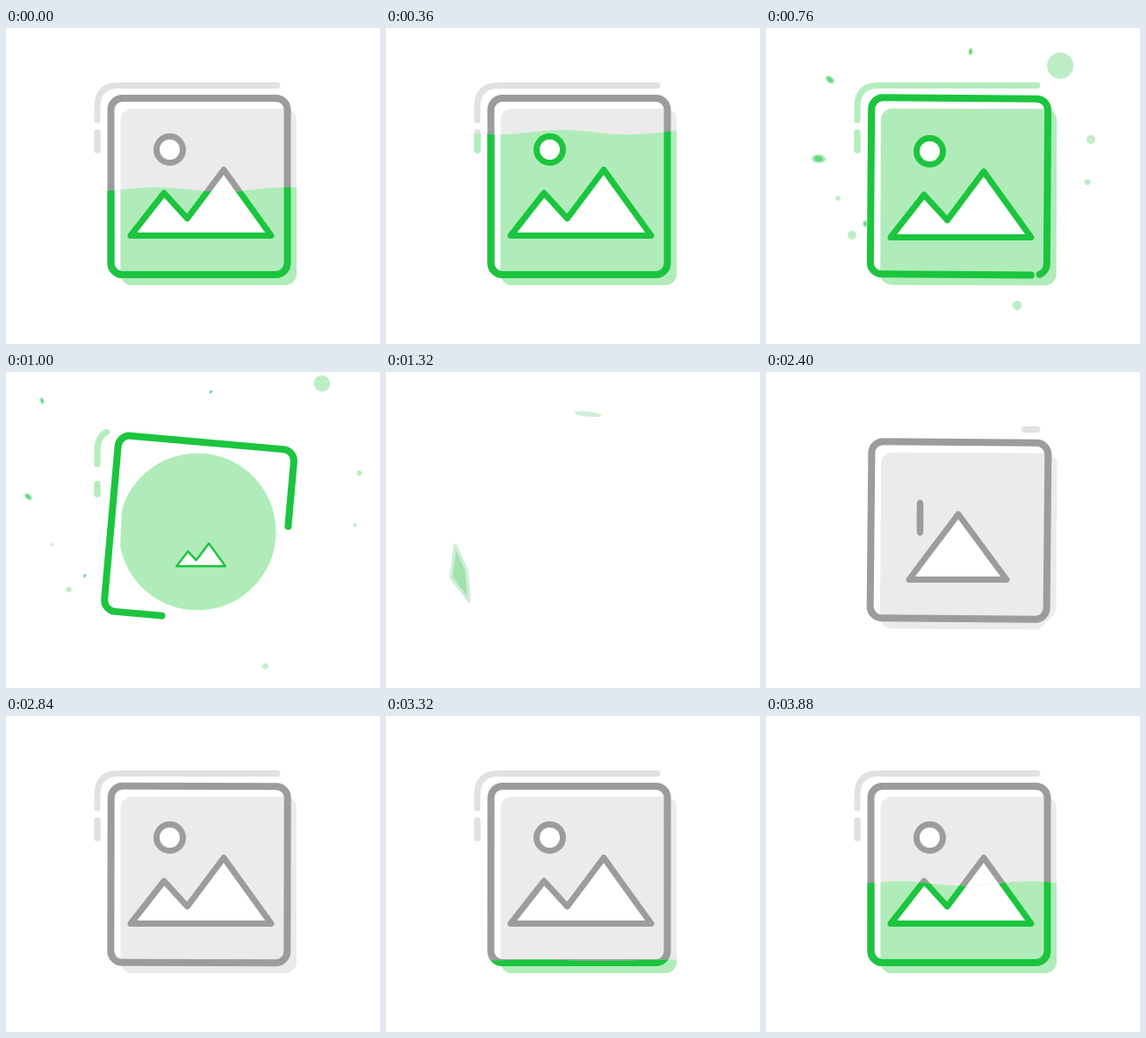
Write an HTML page that moves like this. It is 426 px wide and 360 px high and loops after 3920 ms.

```html
<!DOCTYPE html>
<html lang="en">
<head>
<meta charset="utf-8">
<title>Picture icon loader</title>
<style>
html, body { margin: 0; width: 100%; height: 100%; overflow: hidden; background: #fff; }
svg { display: block; width: 426px; height: 360px; }
</style>
</head>
<body>
<svg viewBox="0 0 426 360" xmlns="http://www.w3.org/2000/svg">
  <defs>
    <clipPath id="level"><path id="wave"/></clipPath>
    <clipPath id="disk"><circle id="spot" cx="218" cy="182"/></clipPath>
  </defs>
  <g id="grey"></g>
  <g id="liquid" clip-path="url(#level)"></g>
  <g id="shards"></g>
  <g id="drops"></g>
</svg>
<script>
const LOOP = 3920;
const REBUILD = 1700;
const FULL = 4640;
const CX = 220, CY = 181;
const $ = id => document.getElementById(id);

function add(parent, tag, attrs = {}) {
  const el = document.createElementNS('http://www.w3.org/2000/svg', tag);
  set(el, attrs);
  parent.appendChild(el);
  return el;
}
function set(el, attrs) {
  for (const k in attrs) el.setAttribute(k, attrs[k]);
}
const show = (el, on) => { el.style.display = on ? '' : 'none'; };
const mix = (a, b, k) => a + (b - a) * k;
const span = (t, a, b) => Math.max(0, Math.min(1, (t - a) / (b - a)));
const ease = (t, a, b) => { const k = span(t, a, b); return k * k * (3 - 2 * k); };
const decay = (t, tau) => Math.exp((REBUILD - t) / tau);

function makeIcon(g, c) {
  const line = (color, width, d = '') => add(g, 'path', {
    d, fill: 'none', stroke: color, 'stroke-width': width,
    'stroke-linecap': 'round', 'stroke-linejoin': 'round', pathLength: 1
  });
  const clip = add(g, 'g', { 'clip-path': 'url(#disk)' });
  const icon = {
    g,
    panel: add(clip, 'rect', { x: 130.5, y: 92, width: 200.5, height: 201, rx: 13, fill: c.pale }),
    arc: line(c.trim, 7, 'M309 65.5H128Q104 65.5 104 90V105'),
    dash: line(c.trim, 7.5, 'M104 119V139'),
    frame: line(c.ink, 8, 'M307.5 281A13 13 0 0 0 320.5 268V93A13 13 0 0 0 307.5 80H132.5A13 13 0 0 0 119.5 93V268A13 13 0 0 0 132.5 281H307.5'),
    hill: line(c.ink, 7),
    sun: add(g, 'ellipse', { fill: '#fff', stroke: c.ink, 'stroke-width': 7 })
  };
  icon.hill.setAttribute('fill', '#fff');
  return icon;
}

const icons = [
  makeIcon($('grey'), { ink: '#9b9c9b', pale: '#ebebeb', trim: '#e1e1e1' }),
  makeIcon($('liquid'), { ink: '#1bc53e', pale: '#b0ecb9', trim: '#b3edbc' })
];

function makeDrop(x, y, r, turn) {
  const g = add($('drops'), 'g');
  const seed = turn !== undefined;
  add(g, 'ellipse', { rx: r, ry: seed ? r * 0.62 : r, fill: seed ? '#a8e9b4' : '#bdeec6' });
  if (seed) add(g, 'ellipse', { rx: r * 0.6, ry: r * 0.38, fill: '#63d77c' });
  return { g, x, y, turn: turn || 0, gain: Math.min(1, Math.abs(x - CX) / 100) };
}
const drops = [
  makeDrop(335, 43, 15), makeDrop(370, 127, 5), makeDrop(366, 175.5, 3.5),
  makeDrop(286, 316, 5.3), makeDrop(98, 236, 5), makeDrop(82, 194, 2.8),
  makeDrop(113, 223, 4, 90), makeDrop(73, 59, 6, 38),
  makeDrop(60, 149, 8, 3), makeDrop(233, 27, 4, 100)
];

const leaf = add($('shards'), 'path', {
  d: 'M-6 -32L7 -3L10 32L-11 5Z', fill: '#a0e3ad', stroke: '#cfeed6',
  'stroke-width': 3.5, 'stroke-linejoin': 'round'
});
const sliver = add($('shards'), 'ellipse', { rx: 15.5, ry: 3, fill: '#d2eed8' });

// Shows the part of a line between fractions a and b.
function trim(el, a, b) {
  show(el, b - a > 0.001);
  set(el, {
    'stroke-dasharray': b - a > 0.999 ? 'none' : `${b - a} 3`,
    'stroke-dashoffset': -a
  });
}

const scaleAt = (k, x, y, sink) =>
  `translate(${x} ${y + sink}) scale(${k}) translate(${-x} ${-y})`;

// A line widens, rises to one peak, then splits into two.
function hillPath(t) {
  const half = 55.5 * ease(t, 1780, 2000);
  const rise = ease(t, 1970, 2340);
  const split = ease(t, 2400, 2680);
  const point = (x1, y1, x2, y2) =>
    [mix(x1, x2, split), mix(236.5, mix(y1, y2, split), rise)];
  const left = point(218.5 - half, 236.5, 142, 236.5);
  const right = point(218.5 + half, 236.5, 302, 236.5);
  if (!rise) return `M${left}L${right}`;
  const top = [point(185, 207, 180, 188), point(204, 182, 206.5, 217), point(219, 162, 248, 161.5)];
  return 'M' + [left, ...top, right].join('L') + 'Z';
}

function drawIcon(icon, t) {
  const build = t > REBUILD;
  show(icon.g, build || t < 1240);

  const fall = 20 * span(t, 620, 1280) ** 2.5;
  const frameTilt = build ? 5.8 * decay(t, 300) : fall;
  const panelTilt = build ? 40 * decay(t, 150) : fall / 2;
  set(icon.frame, {
    transform: `rotate(${frameTilt} ${CX} ${CY})`,
    opacity: build ? mix(0.77, 1, span(t, 1960, 2320)) : 1
  });
  icon.panel.setAttribute('transform', `rotate(${panelTilt} 231 192)`);

  if (build) {
    trim(icon.frame, 0.55 * (1 - span(t, REBUILD, 2045)), mix(0.55, 1, span(t, REBUILD, 1960)));
    trim(icon.arc, 0, ease(t, 2340, 2740));
    trim(icon.dash, 0, ease(t, 2740, 2820));
  } else {
    const cut = 0.5 * span(t, 700, 1240) ** 2;
    trim(icon.frame, cut, 1 - cut);
    trim(icon.arc, ease(t, 780, 1080), 1);
    trim(icon.dash, ease(t, 900, 1120), 1);
  }

  const sink = build ? 0 : 2 * ease(t, 560, 740);
  const hillSize = build ? 1 : 1 - ease(t, 820, 1120);
  const sunSize = build ? 1 : 1 - ease(t, 780, 1020);
  const pose = build ? t : LOOP;
  const stick = ease(pose, 2280, 2390);
  const open = ease(pose, 2400, 2640);
  show(icon.hill, hillSize > 0 && pose > 1780);
  show(icon.sun, sunSize > 0 && stick > 0);
  set(icon.hill, { d: hillPath(pose), transform: scaleAt(hillSize, 222, 210, sink) });
  set(icon.sun, {
    cx: mix(175.5, 186.5, open), cy: mix(166, 138.5, open),
    rx: mix(0.4, 15, open), ry: mix(17, 15, open) * stick,
    transform: scaleAt(sunSize, 186.5, 138.5, sink)
  });
}

function drawWave(t) {
  const u = t < 1500 ? t + LOOP : t;
  const age = u - 3280;
  const y0 = 284 - 0.14 * age - 2.5e-5 * age * age;
  const amp = 2.5 * span(u, 3240, 3500);
  const crest = 170 + 0.5 * (u - LOOP);
  let d = 'M0 360';
  for (let x = 0; x <= 426; x += 6) {
    const y = u > FULL ? 0 : y0 - amp * Math.cos(0.042 * (x - crest));
    d += `L${x} ${y.toFixed(2)}`;
  }
  $('wave').setAttribute('d', d + 'L426 360Z');
  show($('liquid'), u > 3220);
  show($('grey'), u <= FULL);
}

function drawDrops(t) {
  const size = ease(t, 500, 740) * (1 - ease(t, 900, 1140));
  show($('drops'), size > 0);
  for (const p of drops) {
    const k = 1 + (t - 760) * 0.0009 * p.gain;
    p.g.setAttribute('transform',
      `translate(${mix(CX, p.x, k)} ${mix(CY, p.y, k)}) rotate(${p.turn + (t - 760) * 0.15}) scale(${size})`);
  }
}

function drawShards(t) {
  const age = t - 1320;
  const size = ease(t, 1020, 1180) * (1 - ease(t, 1320, 1500));
  const flip = 1 - age * 0.003;
  show($('shards'), size > 0);
  const place = (el, x, y, turn, sx, sy) => el.setAttribute('transform',
    `translate(${x} ${y}) rotate(${turn}) scale(${sx * size} ${sy * size})`);
  place(leaf, 85 - age * 0.12, 229 + age * 0.08, -age * 0.06, flip, 1);
  place(sliver, 230, 48 - age * 0.12, 6 + age * 0.08, 1, flip);
}

function render(now) {
  const t = now % LOOP;
  const radius = t > REBUILD
    ? 155 * (1 - decay(t, 260)) + 100 * ease(t, 2500, 2800)
    : 240 * (1 - ease(t, 720, 1200));
  $('spot').setAttribute('r', radius);
  for (const icon of icons) drawIcon(icon, t);
  drawWave(t);
  drawDrops(t);
  drawShards(t);
}

function tick(now) {
  render(now);
  requestAnimationFrame(tick);
}
render(0);
requestAnimationFrame(tick);
</script>
</body>
</html>
```
